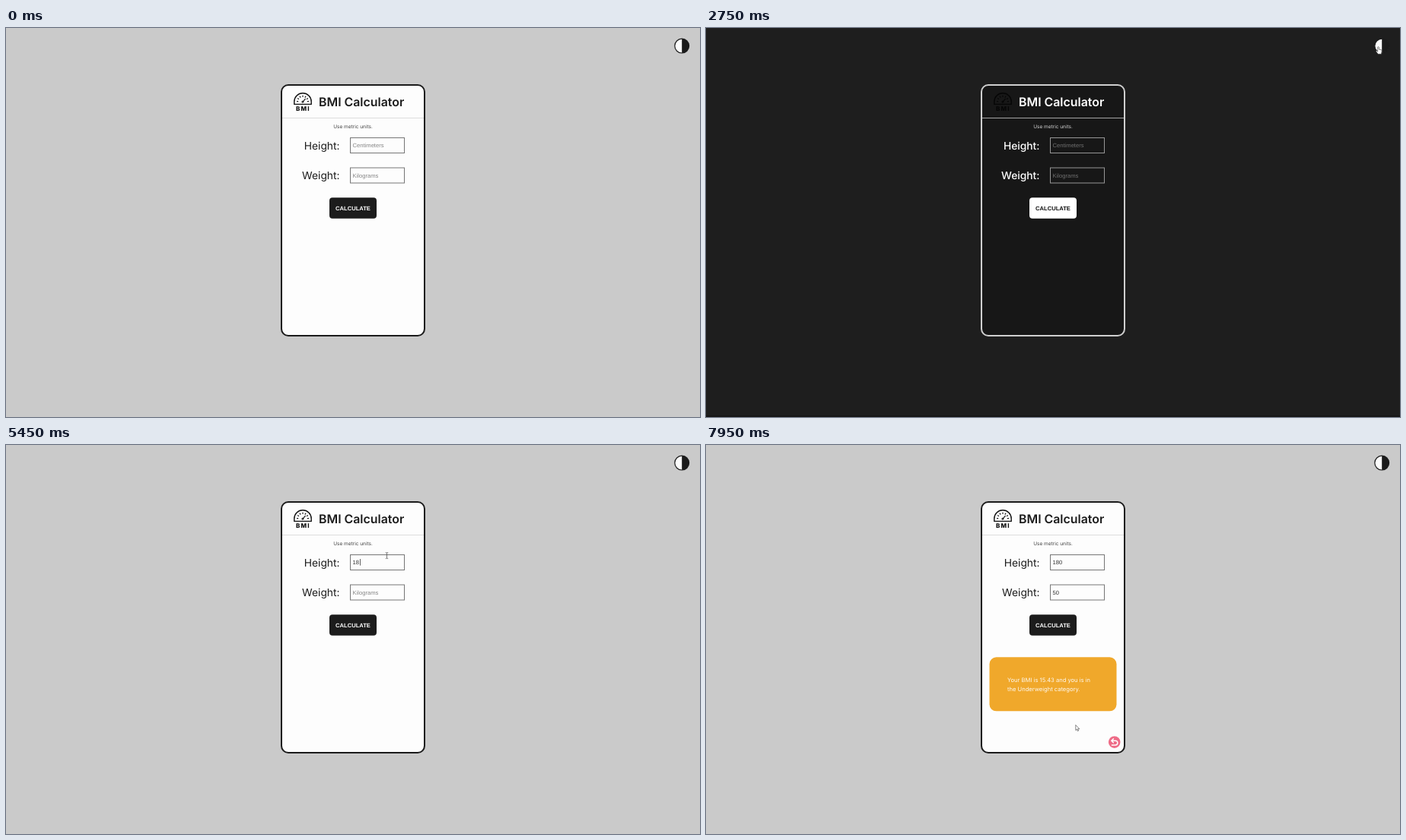
An HTML page for the animation above (8000 ms loop, 912 by 512 pixels).

```html
<!DOCTYPE html>
<html lang="en">
<head>
<meta charset="utf-8">
<title>BMI Calculator</title>
<style>
html, body { margin: 0; width: 100%; height: 100%; overflow: hidden; }
svg {
  display: block; width: 100%; height: 100%;
  --bg: #cacaca; --card: #fdfdfd; --ink: #1b1b1b; --edge: #1b1b1b; --rule: #dcdcdc;
  --note: #444; --field: #767676; --hint: #858585; --btn: #1c1c1c; --btnText: #fff;
  --icon: #111; --foot: #cacaca;
  background: var(--bg);
  font-family: Inter, "Open Sans", sans-serif;
  text-rendering: geometricPrecision;
}
svg.dark {
  --bg: #1e1e1e; --card: #171717; --ink: #fff; --edge: #cfcfcf; --rule: #a5a5a5;
  --note: #d5d5d5; --field: #969696; --hint: #707070; --btn: #fff; --btnText: #111;
  --icon: #060606; --foot: #171717;
}
.ink { fill: var(--ink); }
.label { font-size: 13.8px; fill: var(--ink); }
.dark .label { font-weight: 500; }
.field { fill: none; stroke: var(--field); }
.arial { font-family: "Liberation Sans", Arial, sans-serif; font-size: 7.6px; }
.hint { fill: var(--hint); }
.typed { fill: #333; }
.icon { fill: none; stroke: var(--icon); stroke-width: 1.4; stroke-linejoin: round; stroke-linecap: round; }
</style>
</head>
<body>
<svg id="stage" viewBox="0 0 912 512">
  <rect width="912" height="512" fill="var(--bg)"/>
  <rect y="510" width="912" height="2" fill="var(--foot)"/>

  <g id="toggle">
    <circle cx="888.2" cy="23.6" r="9.4" fill="#fdfdfd" stroke="#1b1b1b" stroke-width="1.2"/>
    <path d="M888.2 14.2a9.4 9.4 0 0 1 0 18.8z" fill="#1b1b1b"/>
  </g>

  <rect x="362" y="75" width="188" height="330" rx="9" fill="var(--card)" stroke="var(--edge)" stroke-width="2"/>
  <path d="M363 118.5H549" stroke="var(--rule)"/>

  <g class="icon">
    <path d="M378.8 100.4V97A11.2 11.2 0 0 1 401.2 97V100.4Z"/>
    <path id="ticks" stroke-width="1.2"/>
    <path d="M390 97.2L393.3 93.4" stroke-width="1.2"/>
    <circle cx="389.8" cy="97.2" r="1" stroke-width="1"/>
  </g>
  <text x="381" y="108.8" font-size="8" font-weight="800" letter-spacing="1.2" fill="var(--icon)">BMI</text>

  <text class="ink" x="411" y="102.6" font-size="15.9" font-weight="600">BMI Calculator</text>
  <text x="456" y="132.2" font-size="6.5" text-anchor="middle" fill="var(--note)">Use metric units.</text>
  <text class="label" x="438.5" y="159.6" text-anchor="end">Height:</text>
  <text class="label" x="438.5" y="199" text-anchor="end">Weight:</text>
  <rect class="field" x="452.5" y="144.5" width="71" height="20"/>
  <rect class="field" x="452.5" y="184" width="71" height="20"/>
  <text id="height" class="arial" x="455.6" y="157.4"></text>
  <text id="weight" class="arial" x="455.6" y="196.7"></text>
  <rect id="caret" width=".7" height="8.6" fill="#222"/>

  <rect x="425" y="223.3" width="62" height="27.5" rx="4" fill="var(--btn)"/>
  <text class="arial" x="456" y="239.6" text-anchor="middle" font-weight="700" fill="var(--btnText)">CALCULATE</text>

  <g id="result">
    <rect x="372.5" y="279.3" width="167" height="71" rx="9" fill="#f0a82b"/>
    <g font-size="7.6" fill="#fff" fill-opacity=".93">
      <text x="396" y="311.6">Your BMI is 15.43 and you is in</text>
      <text x="396" y="323.5">the Underweight category.</text>
    </g>
    <circle cx="536.7" cy="391.1" r="7.8" fill="#ee6c87"/>
    <path d="M533.2 389.2H538a2.9 2.9 0 0 1 0 5.8H533.4M535.4 386.7L532.8 389.2L535.4 391.7"
      fill="none" stroke="#fff" stroke-width="1.5" stroke-linecap="round" stroke-linejoin="round"/>
  </g>

  <g id="cursor">
    <path id="arrow" d="M0 0V7L1.6 5.6L2.7 8L3.8 7.5L2.8 5.2H5Z" fill="#fff" stroke="#333" stroke-width=".6"/>
    <path id="hand" d="M-.8 .6Q0 -.5 .8 .6V3.6L4 4.3Q4.8 4.6 4.6 5.6L4 9.8H-.4L-3 6.2Q-3 5.1 -2 5.4L-.8 6.5Z" fill="#fff" stroke="#333" stroke-width=".6"/>
    <path id="beam" d="M-1.6 -3.9H-.5L0 -3.4L.5 -3.9H1.6M0 -3.4V3.4M-1.6 3.9H-.5L0 3.4L.5 3.9H1.6" fill="none" stroke="#555" stroke-width=".8"/>
  </g>
</svg>
<script>
const LOOP = 8000;
const el = id => document.getElementById(id);
const stage = el('stage');
const clamp = v => Math.min(1, Math.max(0, v));
const show = (node, on) => node.setAttribute('visibility', on ? 'inherit' : 'hidden');

// Pointer path: time, x, y
const path = [
  [600, 788, 316], [950, 470, 240], [1150, 470, 240], [1450, 412, 245], [1950, 653, 172],
  [2600, 883.5, 24.5], [3250, 883.5, 24.5], [4000, 892, 20], [4149, 892, 20],
  [4150, 842.8, 35], [4650, 500.5, 145.5], [6950, 500.5, 145.5], [7200, 526, 150],
  [7500, 472, 240], [7700, 474, 246], [7950, 485.8, 368.5]
];

// Fields: focus time, then the time of each typed character
const fields = [
  { node: el('height'), hint: 'Centimeters', value: '180', focus: 4650, blur: 5900, keys: [5300, 5450, 5600], y: 150 },
  { node: el('weight'), hint: 'Kilograms', value: '50', focus: 5900, blur: 7550, keys: [6350, 6550], y: 189.4 }
];

el('ticks').setAttribute('d', [0, 30, 60, 90, 120, 150, 180].map(deg => {
  const a = deg * Math.PI / 180;
  const at = r => `${390 + r * Math.cos(a)} ${96.6 - r * Math.sin(a)}`;
  return `M${at(6.3)}L${at(7.5)}`;
}).join(''));

function pointerAt(t) {
  const i = path.findIndex(p => p[0] > t);
  if (i < 0) return path[path.length - 1].slice(1);
  if (i === 0) return path[0].slice(1);
  const [a, b] = [path[i - 1], path[i]];
  const k = (t - a[0]) / (b[0] - a[0]);
  const e = k * k * (3 - 2 * k);
  return [a[1] + (b[1] - a[1]) * e, a[2] + (b[2] - a[2]) * e];
}

function pointerShape(x, y) {
  const inside = (l, t, r, b) => x >= l && x <= r && y >= t && y <= b;
  if (Math.hypot(x - 888.2, y - 23.6) < 10 || inside(425, 223, 487, 251)) return 'hand';
  return inside(452, 144, 524, 165) || inside(452, 184, 524, 204) ? 'beam' : 'arrow';
}

function drawFields(t) {
  let caret = false;
  for (const f of fields) {
    const typed = f.keys.filter(k => t >= k);
    const focused = t >= f.focus && t < f.blur;
    f.node.textContent = t < f.focus ? f.hint : f.value.slice(0, typed.length);
    f.node.setAttribute('class', t < f.focus ? 'arial hint' : 'arial typed');
    if (!focused) continue;
    const since = t - (typed.length ? typed[typed.length - 1] : f.focus);
    caret = since % 1000 < 500;
    el('caret').setAttribute('x', 455.6 + typed.length * 4.23 + (typed.length ? 1 : 0));
    el('caret').setAttribute('y', f.y);
  }
  show(el('caret'), caret);
}

function draw(t) {
  stage.classList.toggle('dark', t >= 2750 && t < 4150);
  drawFields(t);
  el('result').setAttribute('opacity', clamp((t - 7550) / 200));
  const [x, y] = pointerAt(t);
  const shape = pointerShape(x, y);
  el('cursor').setAttribute('transform', `translate(${x} ${y})`);
  show(el('cursor'), t >= 600);
  for (const id of ['arrow', 'hand', 'beam']) show(el(id), id === shape);
}

const start = performance.now();
function tick() {
  draw((performance.now() - start) % LOOP);
  requestAnimationFrame(tick);
}
tick();
</script>
</body>
</html>
```
